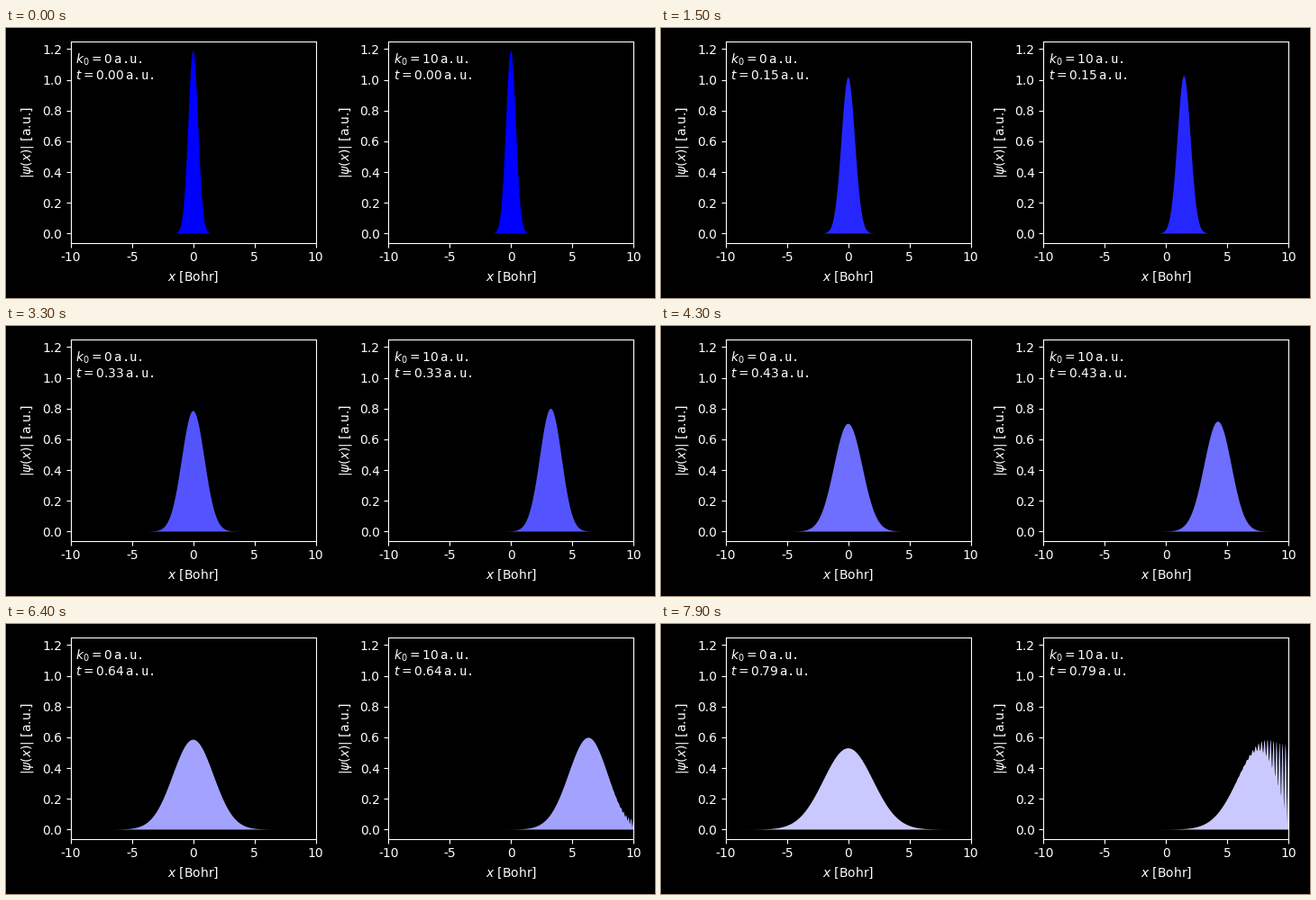
Recreate the animation shown at these times as a matplotlib script. Size 720x300 px, loop 8 s.

```python
import numpy as np
import matplotlib.pyplot as plt
from matplotlib.animation import FuncAnimation

plt.style.use("dark_background")
plt.rcParams.update({"font.family": "DejaVu Sans", "font.size": 10,
                     "axes.unicode_minus": False})

FRAMES, DT = 80, 0.01
WALL, DX = 10.0, 0.03
PEAK = 2 ** 0.25
x = np.linspace(-WALL, WALL, round(2 * WALL / DX) + 1)


class Packet:
    """Gaussian wave packet on a lattice with a reflecting right wall."""

    def __init__(self, ax, k0):
        self.k0 = k0
        dk = 0.1
        q = np.arange(-15, 15 + dk / 2, dk)
        k = k0 + q
        self.weight = PEAK * dk / (2 * np.pi) * np.exp(-q**2 / (4 * np.pi))
        self.omega = (1 - np.cos(k * DX)) / DX**2
        self.waves = (np.exp(1j * np.outer(x, k))
                      + np.exp(1j * np.outer(2 * WALL - x, k)))
        self.fill = ax.fill_between(x, 0 * x, lw=0)
        self.label = ax.text(0.02, 0.95, "", transform=ax.transAxes, va="top",
                             family="DejaVu Sans Mono")
        ax.set(xlim=(-WALL, WALL), ylim=(-0.05 * PEAK, 1.05 * PEAK),
               xticks=range(-10, 11, 5))
        ax.set_xlabel("$x$ [Bohr]", labelpad=4.6)
        ax.set_ylabel(r"$|\psi(x)|$ [a.u.]", labelpad=5.1)

    def show(self, t):
        psi = self.waves @ (self.weight * np.exp(-1j * self.omega * t))
        top = np.column_stack([x, np.abs(psi)])
        base = [[x[-1], 0], [x[0], 0]]
        self.fill.set_verts([np.vstack([top, base])])
        self.fill.set_facecolor((t, t, 1))
        self.label.set_text(rf"$k_0={self.k0}\,$a.u." "\n"
                            rf"$t={t:.2f}\,$a.u.")
        return self.fill, self.label


fig, axes = plt.subplots(1, 2, figsize=(7.2, 3), dpi=100)
packets = [Packet(ax, k0) for ax, k0 in zip(axes, (0, 10))]
fig.tight_layout()


def update(i):
    return [artist for p in packets for artist in p.show(i * DT)]


anim = FuncAnimation(fig, update, frames=FRAMES, interval=100,
                     repeat=True, repeat_delay=0)
plt.show()
```
